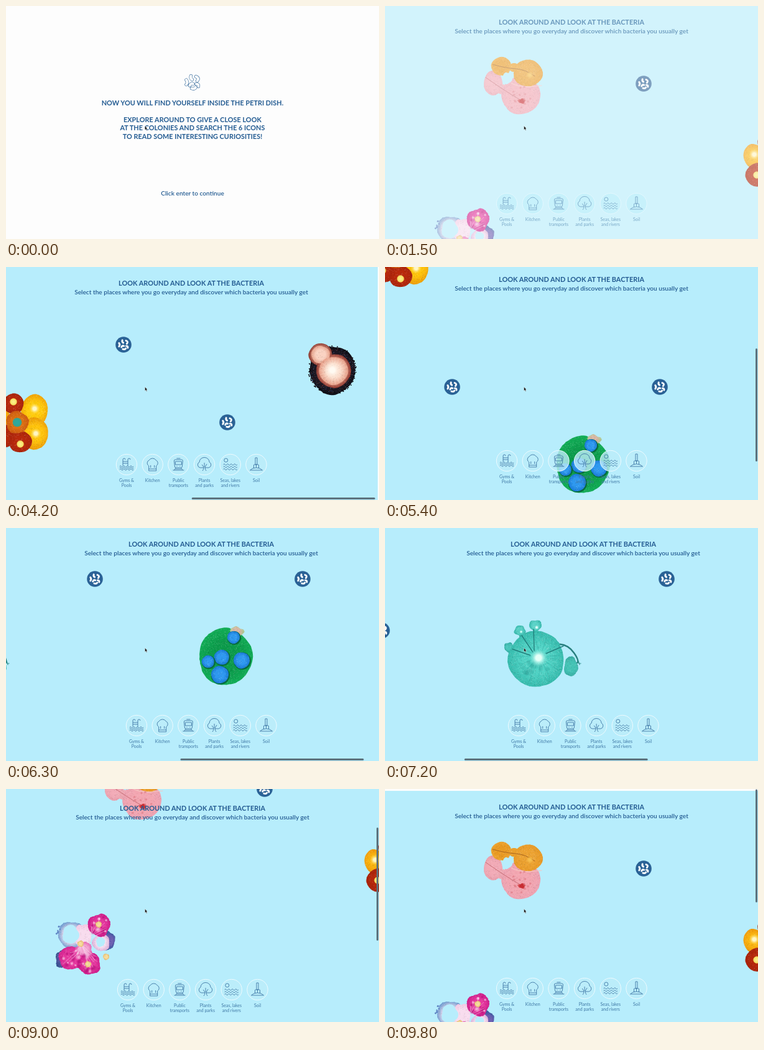
These frames come from a looping animation (600x375 px, 9.9 s). An HTML page with a canvas:

```html
<!DOCTYPE html>
<html lang="en">
<head>
<meta charset="utf-8">
<title>Petri dish</title>
<style>
  html, body { margin: 0; width: 100%; height: 100%; overflow: hidden; background: #fdfdfd; }
  #stage { position: relative; width: 100%; height: 100%; overflow: hidden; }
  canvas, svg { position: absolute; left: 0; top: 0; }
  text { font-family: Lato, "Open Sans", sans-serif; fill: #245c92; text-anchor: middle; }
  .caps { font-size: 10.9px; font-weight: 700; }
  .line { font-size: 10.15px; font-weight: 600; }
  .label { font-size: 7px; fill: #3f78a5; }
  .disc { fill: #bdeefbcc; stroke: #eefbff; stroke-width: 1; }
  .icon { fill: none; stroke: #3f78a5; stroke-width: .9; }
  .bar { fill: #5a707c; }
  .beans { fill: none; stroke-linecap: round; }
</style>
</head>
<body>
<div id="stage">
<canvas id="view" width="600" height="375"></canvas>
<svg width="600" height="375" viewBox="0 0 600 375">
  <g id="page">
    <g id="menu">
      <text class="caps" x="300" y="30">LOOK AROUND AND LOOK AT THE BACTERIA</text>
      <text class="line" x="300" y="43.5">Select the places where you go everyday and discover which bacteria you usually get</text>
    </g>
    <rect id="barX" class="bar" y="371" width="295" height="3" rx="1.5"/>
    <rect id="barY" class="bar" x="596" width="3" height="182" rx="1.5"/>
  </g>
  <g id="intro">
    <g transform="translate(300 122.5)">
      <path class="beans" stroke="#2a6296" stroke-width="5.2"/>
      <path class="beans" stroke="#fdfdfd" stroke-width="4.1"/>
    </g>
    <text class="caps" x="300" y="160">NOW YOU WILL FIND YOURSELF INSIDE THE PETRI DISH.</text>
    <text class="caps" x="300" y="187">EXPLORE AROUND TO GIVE A CLOSE LOOK</text>
    <text class="caps" x="300" y="200">AT THE COLONIES AND SEARCH THE 6 ICONS</text>
    <text class="caps" x="300" y="213.5">TO READ SOME INTERESTING CURIOSITIES!</text>
    <text class="line" x="300" y="305">Click enter to continue</text>
  </g>
  <path d="M223.5 193v6.2l1.4-1.2 1 2.2 1-.5-1-2.1h1.8z" fill="#111" stroke="#fff" stroke-width=".4"/>
</svg>
</div>
<script>
const $ = id => document.getElementById(id);
const LOOP = 9900, MAX_X = 602, MAX_Y = 377, WATER = '#b7edfc';
const beans = 'M-10-3.5Q-7 .5-10 4M-2.5-10Q-4-6-.5-4M5.5-9Q11.5-6.5 7.5-2M-4.5 5.5Q-2.5 1 1 3M-1.5 10Q3.5 11.5 5 8.5M6 3Q10.5 3 9.5 7';
document.querySelectorAll('.beans').forEach(p => p.setAttribute('d', beans));

// ---- Menu ----
const wave = y => `M-11.2 ${y}` + 'q1.4-2.4 2.8 0t2.8 0t2.8 0t2.8 0t2.8 0t2.8 0t2.8 0t2.8 0';
const items = [
  ['Gyms &', 'Pools', 'M-6 2V-8a2 2 0 0 1 4 0M2 2V-8a2 2 0 0 1 4 0M-6-5H2M-6-2H2' + wave(3) + wave(5.5) + wave(8)],
  ['Kitchen', '', 'M-6 10V2A5 5 0 0 1-5.5-7A6 5 0 0 1 5.5-7A5 5 0 0 1 6 2V10zM-6 7H6M-3 5V1M3 5V1'],
  ['Public', 'transports', 'M-5-8H5Q7-8 7-6L6 3Q6 5 4 5H-4Q-6 5-6 3L-7-6Q-7-8-5-8M-5-5H5V0H-5zM-3 2.5h1M2 2.5h1M-4 5l-3 4M4 5l3 4M-9 9H9M-5 7H5M-3-10H3'],
  ['Plants', 'and parks', 'M-3 10Q-1 8-1 4L-4 0M1 4L4-1M0 4V-3M3 10Q1 8 1 4M-1 5H-7a4.8 4.8 0 0 1-1-9a8 7.5 0 0 1 16 0a4.8 4.8 0 0 1-1 9H1'],
  ['Seas, lakes', 'and rivers', 'M-10-7a3 3 0 1 0 6 0a3 3 0 1 0-6 0' + wave(0) + wave(3.8) + wave(7.6)],
  ['Soil', '', 'M-1.5-11H1.5V0H-1.5zM-4 6V1Q-4 0-3 0H3Q4 0 4 1V6M0 0V5M-10 9Q-6 5 0 5T10 9z']
];
$('menu').innerHTML += items.map(([a, b, d], i) => `
  <g transform="translate(${196 + i * 41.7} 318)"><circle class="disc" r="16.7"/>
  <path class="icon" d="${d}"/><text class="label" y="27.5">${a}</text>
  <text class="label" y="36">${b}</text></g>`).join('');

// ---- World, drawn once ----
const world = document.createElement('canvas');
world.width = MAX_X + 600;
world.height = MAX_Y + 375;
const g = world.getContext('2d');
let seed = 7;
const rnd = () => (seed = seed * 16807 % 2147483647) / 2147483647;
const spread = r => (rnd() * 2 - 1) * r;

function blob(x, y, rx, ry, inner, outer = inner, rough = .018, grain = .6) {
  const a = rnd() * 6, steps = 70;
  g.save();
  g.translate(x, y);
  g.beginPath();
  for (let i = 0; i < steps; i++) {
    const u = i / steps * Math.PI * 2;
    const r = 1 + rough * (Math.sin(3 * u + a) + .7 * Math.sin(5 * u + a * 2) + rnd() - .5);
    g.lineTo(Math.cos(u) * rx * r, Math.sin(u) * ry * r);
  }
  const fill = g.createRadialGradient(0, 0, 0, 0, 0, Math.max(rx, ry));
  fill.addColorStop(.5, inner);
  fill.addColorStop(1, outer);
  g.fillStyle = fill;
  g.fill();
  g.clip();
  for (let n = rx * ry * grain; n > 0; n--) {
    g.fillStyle = rnd() < .5 ? '#0000001c' : '#ffffff30';
    g.fillRect(spread(rx), spread(ry), 1, 1);
  }
  g.restore();
}

function spot(x, y, r, core, edge) {
  const fill = g.createRadialGradient(x, y, r * .3, x, y, r);
  fill.addColorStop(0, core);
  fill.addColorStop(1, edge);
  g.fillStyle = fill;
  g.beginPath();
  g.arc(x, y, r, 0, 7);
  g.fill();
}

function line(d, color, width = 1) {
  g.strokeStyle = color;
  g.lineWidth = width;
  g.lineCap = 'round';
  g.stroke(new Path2D(d));
}

function at(x, y, draw) {
  g.save();
  g.translate(x, y);
  draw();
  g.restore();
}

function badge(x, y) {
  at(x, y, () => {
    spot(0, 0, 12.8, '#2a6296', '#2a6296');
    g.scale(.72, .72);
    line(beans, '#fff', 4);
  });
}

function rosyColony() {
  blob(-32, -3, 15, 20, '#f2abb7', '#e9a0ae');
  blob(-18, 7, 9, 8, '#efa9b4');
  blob(12.5, 17, 31.5, 30, '#f3a6b1', '#eda3b2');
  blob(-19, -30, 16, 15, '#e99a22', '#eda32f');
  blob(24, -19, 23.5, 21.5, '#eca231', '#e89a27');
  blob(2, -28, 9, 7, '#eba02b');
  blob(-9, -11, 8, 9, WATER, WATER, .07, 0);
  line('M-3-3Q12 6 46 1', '#f5c5c0', 1.2);
  line('M-33-33Q-12-27 4-26T35-14', '#a8641d');
  line('M-44-12Q-20 5-2 16T18 27', '#c86d76');
  spot(27, -16, 6, '#f7c04d', '#f7c04d00');
  blob(14, 26, 6, 4, '#c92d32', '#df5d63', .14);
  for (let i = 0; i < 14; i++) spot(13 + spread(22), 20 + spread(17), 2.5, '#dc7580aa', '#dc758000');
}

function flowerColony() {
  blob(26, -21, 21.5, 25, '#ffcb0c', '#f0a306');
  blob(27, 17, 20.5, 26, '#ffc40c', '#eb9a07');
  blob(-31, -10, 16.5, 19, '#fbb510', '#ee970a');
  blob(-8, -31, 16.5, 16.5, '#b9290d', '#a8240c');
  blob(-25, 21, 19, 19, '#b6280b', '#a8230b');
  blob(3, 30, 18.5, 17.5, '#b8290c', '#aa240c');
  blob(-2, -1, 18, 18, '#dd7213', '#cf5c10', .04);
  for (const [x, y] of [[26, -23], [28, 17], [-30, -12]]) spot(x, y, 9, '#fff6c4', '#ffda3500');
  for (const [x, y] of [[-8, -34], [-26, 21], [3, 34]]) spot(x, y, 5.7, '#fbee85', '#f4d958');
  spot(-2, -1, 7.3, '#2ca99d', '#3ca08b');
}

function darkColony() {
  const rim = (n, from, depth, r, color) => {
    for (let i = 0; i < n; i++) {
      const u = rnd() * 6.283, d = from + rnd() * depth;
      spot(1 + Math.cos(u) * d, 2 + Math.sin(u) * d, r, color(), '#0000');
    }
  };
  blob(1, 2, 36.5, 39, '#251d2b', '#111018', .025);
  rim(170, 35, 4, 1.3, () => '#111018');
  rim(130, 28, 9, .9, () => rnd() < .5 ? '#41578f' : '#7a3032');
  blob(-18, -23, 19, 18, '#e9a590', '#8d3a30');
  blob(3, 3, 28, 27, '#f0b49e', '#94392f');
  blob(-18, -23, 15, 14, '#fad2c2', '#e7a28b');
  blob(3, 3, 23.5, 22.5, '#fbdccb', '#e69c85');
  spot(1, 2, 13, '#fffaf2', '#fff0e200');
  for (let i = 0; i < 22; i++) {
    const c = Math.cos(i * .286), s = Math.sin(i * .286);
    line(`M${3 + c * 9} ${3 + s * 9}L${3 + c * 22} ${3 + s * 22}`, '#fff0df55', .7);
  }
}

function greenColony() {
  blob(0, 0, 43, 46, '#0c9b4b', '#12ae57', .02, .8);
  blob(18, -40, 11, 8, '#d9b8a6', '#b1c994', .1);
  for (const [x, y, r] of [[13, -31, 10], [-6, 1, 12], [26, 6, 13], [-9, 29, 14], [-28, 8, 10]]) {
    spot(x + 1, y + 1, r + 1, '#086b3c', '#086b3c');
    blob(x, y, r, r, '#2f99f0', '#197bd8');
  }
}

function tealColony() {
  line('M34-18Q48-17 57-4T62 12', '#277f7e', 2.4);
  line('M-20 0Q-30-22-29-38M-4-6L-6-44M-16-2L-45-10', '#2f9c95', 4);
  blob(-30, -40, 9, 8, '#55cfc3', '#36b7ab', .08);
  blob(-5, -48, 10, 9, '#5bd3c8', '#35b7aa', .08);
  blob(-48, -13, 7, 8, '#4bc6bb', '#2eaaa0', .08);
  blob(52, 18, 11, 16, '#44c3b5', '#35aa9f', .06);
  blob(-4, 6, 45, 45, '#4fd3c5', '#37bcae', .015, 1);
  for (let i = 0; i < 40; i++) {
    const u = i * .157, c = Math.cos(u), s = Math.sin(u), r = 27 + rnd() * 14;
    line(`M${c * 12} ${4 + s * 12}L${-4 + c * r} ${6 + s * r}`, i % 3 ? '#7fe9dd44' : '#218f8a55', .8);
  }
  for (let i = 0; i < 14; i++) spot(-6 + spread(20), 20 + spread(10), 5, '#1f918a44', '#1f918a00');
  line('M12-3L40-15M-9-5L-27-32M-7-7L-8-42M-13 0L-42-10', '#207f7c', 1.4);
  spot(-28, -38, 3, '#d5fff8', '#6ed9d000');
  spot(-3, -45, 4, '#e1fffa', '#6ed9d000');
  spot(0, 4, 15, '#e4fff8', '#72eadd00');
  line('M62 12l6 1M64 9l2 6', '#318e8b', 1.2);
}

function magentaColony() {
  // Pale cells around two open holes, over blue tips
  blob(-36, 24, 14, 14, '#5d55a5', '#35508f', .08);
  blob(36, -6, 10, 15, '#6a5db0', '#2f5a9c', .08);
  blob(-24, -15, 21, 22, '#f3e4f4', '#6f9bd0', .05);
  blob(24, -3, 14, 14, '#f6e2f2', '#dfb4dc', .05);
  blob(-5, -12, 13, 22, '#f8dcee', '#f3c3e2', .08);
  blob(-25, -16, 13, 15, WATER, WATER, .05, 0);
  blob(23, -4, 7, 8, WATER, WATER, .05, 0);
  const lobes = [[21, -31, 18, 18], [-22, 22, 23, 18], [5, 31, 18, 18]];
  for (const lobe of lobes) blob(...lobe, '#e6389f', '#d01f8c', .06);
  blob(-3, 8, 13, 11, '#f3a4d2', '#e55cae', .1);
  for (const [x, y, rx, ry] of lobes) {
    for (let i = 0; i < 14; i++) {
      const px = x + spread(rx * .75), py = y + spread(ry * .75);
      spot(px, py, 2 + rnd() * 4, i % 2 ? '#fbd5ecaa' : '#b8107baa', i % 2 ? '#fbd5ec00' : '#b8107b00');
    }
    for (let i = 0; i < 7; i++) {
      line(`M-9-1Q${x * .5 + spread(7)} ${y * .5} ${x + spread(rx * .7)} ${y + spread(ry * .7)}`, '#fbe0f388', .8);
    }
  }
  for (let i = 0; i < 9; i++) spot(-45 + spread(5), -24 + spread(8), .6 + rnd() * 1.3, '#577fc0', '#799ed2');
  for (const [x, y] of [[20, -32], [-9, -1], [3, 32], [32, 20]]) blob(x, y, 5, 5, '#f6dc9c', '#e7bd70', .05);
}

g.fillStyle = WATER;
g.fillRect(0, 0, world.width, world.height);
at(206, 127, rosyColony);
at(624, 251, flowerColony);
at(1128, 164, darkColony);
at(920, 584, greenColony);
at(504, 582, tealColony);
at(129, 375, magentaColony);
[[416, 125], [793, 125], [960, 250], [710, 459], [1044, 459], [252, 542]].forEach(p => badge(...p));

// ---- Scrolling: [time, offset] ----
const keysX = [[2100, 0], [2600, 8], [2800, 40], [2900, 97], [3000, 157], [3200, 250], [3600, 410],
  [3900, 550], [4100, 604], [4200, 604], [4400, 602], [6100, 602], [6400, 540], [6700, 440],
  [6800, 440], [6900, 425], [7100, 295], [7200, 257], [7300, 219], [7600, 80], [7900, 0]];
const keysY = [[4500, 0], [5000, 180], [5300, 254], [5400, 266], [5500, 278], [5800, 350], [6100, 377],
  [7700, 377], [8000, 345], [8500, 220], [8900, 135], [9000, 125], [9100, 115], [9400, 55], [9700, -3]];

// Monotone cubic interpolation
function glide(keys, t) {
  const last = keys.length - 1;
  if (t <= keys[0][0]) return keys[0][1];
  if (t >= keys[last][0]) return keys[last][1];
  const secant = i => i < 0 || i >= last ? 0 : (keys[i + 1][1] - keys[i][1]) / (keys[i + 1][0] - keys[i][0]);
  const slope = i => {
    const a = secant(i - 1), b = secant(i);
    return a * b > 0 ? 2 * a * b / (a + b) : 0;
  };
  const i = keys.findIndex(k => k[0] > t) - 1;
  const [t0, p0] = keys[i], [t1, p1] = keys[i + 1], h = t1 - t0, u = (t - t0) / h, v = 1 - u;
  return v * v * (1 + 2 * u) * p0 + u * u * (3 - 2 * u) * p1 + h * u * v * (v * slope(i) - u * slope(i + 1));
}

// The menu trails fast scrolling and follows the overscroll
function menuShift(keys, t, max) {
  const p = glide(keys, t), lag = (glide(keys, t + 5) - glide(keys, t - 5)) * 5;
  return -Math.round(lag + p - Math.min(max, Math.max(0, p)));
}

const clamp = v => Math.min(1, Math.max(0, v));
const within = (t, a, b) => t >= a && t < b ? 1 : 0;
const view = $('view').getContext('2d');

function frame(now) {
  const t = Math.floor(now % LOOP / 100) * 100;
  const x = Math.round(glide(keysX, t)), y = Math.round(glide(keysY, t));
  view.clearRect(0, 0, 600, 375);
  view.drawImage(world, -x, -y);
  $('intro').style.opacity = clamp(1 - t / 700);
  $('page').style.opacity = $('view').style.opacity = clamp((t - 900) / 1000);
  $('menu').setAttribute('transform', `translate(${menuShift(keysX, t, MAX_X)} ${menuShift(keysY, t, MAX_Y)})`);
  $('barX').setAttribute('x', 1 + x * .493);
  $('barY').setAttribute('y', .5 + Math.max(0, y) * .491);
  $('barX').style.opacity = within(t, 2200, 4600) || within(t, 6200, 7700);
  $('barY').style.opacity = within(t, 4600, 6200) || within(t, 7700, LOOP);
  requestAnimationFrame(frame);
}
requestAnimationFrame(frame);
</script>
</body>
</html>
```
